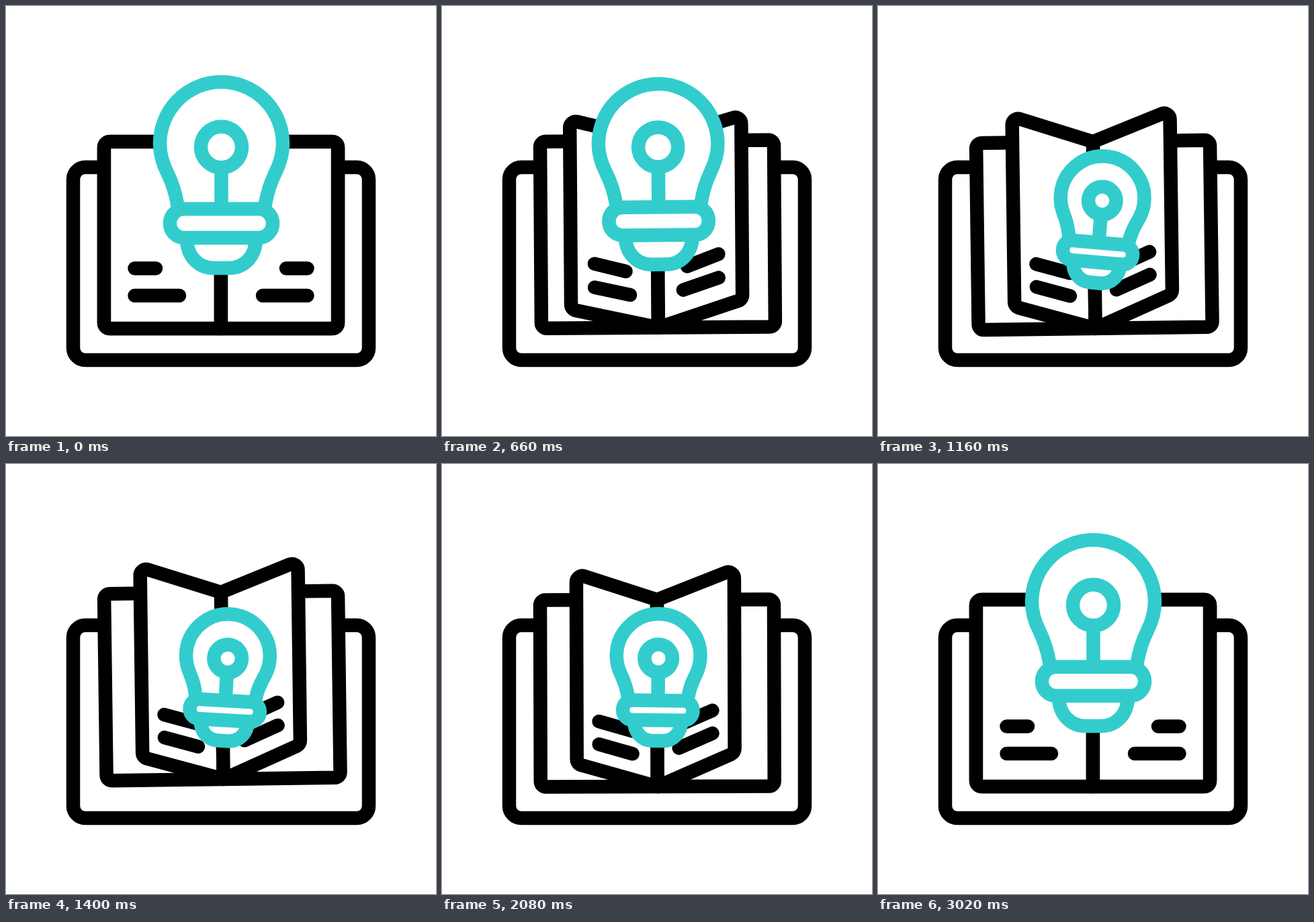
Animation of 640x640 px, one loop 3.22 s. Source, as an HTML page with a canvas:

```html
<!DOCTYPE html>
<html lang="en">
<head>
<meta charset="utf-8">
<title>Book and bulb</title>
<style>
  html, body { margin: 0; width: 100%; height: 100%; overflow: hidden; background: #fff; }
  canvas { display: block; width: 640px; height: 640px; }
</style>
</head>
<body>
<canvas id="stage" width="640" height="640"></canvas>
<script>
const LOOP = 3220, INK = '#000', TEAL = '#33cccc';
const MID = 320, TOP = 202, BOTTOM = 480, HALF = 174;
const ctx = document.getElementById('stage').getContext('2d');

const rad = deg => deg * Math.PI / 180;
const mix = (a, b, u) => a + (b - a) * u;

// 0 before a, 1 after b, cosine ease between
function ease(t, a, b) {
  const u = Math.min(1, Math.max(0, (t - a) / (b - a)));
  return (1 - Math.cos(Math.PI * u)) / 2;
}

function pose(t) {
  const rise = ease(t, 220, 400);
  const drop = ease(t, 400, 1150);
  const swing = ease(t, 400, 900);
  const settle = ease(t, 1800, 2160);
  const close = ease(t, 300, 800);
  const open = ease(t, 2440, 2700);
  const wave = Math.cos(2 * Math.PI * (t - 920) / 960);
  return {
    fold: close - open,
    textFold: close - ease(t, 2440, 2760),
    bookY: 11 * wave * (ease(t, 220, 700) - ease(t, 1420, 1760)),
    bookTilt: -(0.75 * swing + 0.65 * ease(t, 1400, 1740)) * (1 - settle),
    scale: 1 + 0.077 * rise - 0.395 * drop + 0.318 * open,
    bulbX: MID + 2.6 * (rise - settle),
    bulbY: 390 - 15.5 * rise + 37.5 * drop - 22 * ease(t, 2510, 2700),
    bulbTilt: ((11.5 + 1.7 * wave) * swing - 6.5 * rise) * (1 - settle),
    rayHead: ease(t, 2720, 2880),
    rayTail: ease(t, 2820, 3020)
  };
}

// Page sizes when folded; side is -1 for left, 1 for right
const pages = [
  { side: -1, width: 120, top: 163, bottom: 446 },
  { side: 1, width: 115, top: 157, bottom: 430 }
];
const textRows = [
  { y: 390.5, near: 97, lift: 63 },
  { y: 431, near: 62, lift: 29 }
];

function paint(path, color) {
  ctx.fillStyle = '#fff';
  ctx.fill(path);
  ctx.strokeStyle = color;
  ctx.stroke(path);
}

function box(x, y, w, h, r) {
  const p = new Path2D();
  p.roundRect(x, y, w, h, r);
  return p;
}

function line(x0, y0, x1, y1) {
  ctx.beginPath();
  ctx.moveTo(x0, y0);
  ctx.lineTo(x1, y1);
  ctx.stroke();
}

function drawPage({ side, width, top, bottom }, fold) {
  const x = MID + side * mix(HALF, width, fold);
  const y0 = mix(TOP, top, fold), y1 = mix(BOTTOM, bottom, fold);
  const p = new Path2D();
  p.moveTo(MID, TOP);
  p.arcTo(x, y0, x, y1, 9);
  p.arcTo(x, y1, MID, BOTTOM, 9);
  p.lineTo(MID, BOTTOM);
  p.closePath();
  paint(p, INK);
}

// Folded text runs parallel to the bottom edge of its page
function drawText({ side, width, bottom }, fold) {
  const far = width - 33, run = 50;
  const sink = run * (BOTTOM - bottom) / width;
  for (const { y, near, lift } of textRows) {
    const y0 = bottom - lift;
    line(MID + side * mix(128.5, far, fold), mix(y, y0, fold),
      MID + side * mix(near, far - run, fold), mix(y, y0 + sink, fold));
  }
}

function drawBook(p) {
  ctx.save();
  ctx.translate(MID, TOP + p.bookY);
  ctx.rotate(rad(p.bookTilt));
  ctx.translate(-MID, -TOP);
  paint(box(MID - HALF, TOP, 2 * HALF, BOTTOM - TOP, 8), INK);
  pages.forEach(page => drawPage(page, p.fold));
  ctx.lineCap = 'round';
  pages.forEach(page => drawText(page, p.textFold));
  ctx.restore();
}

// Bulb outlines around the foot of the bulb
const ring = new Path2D();
ring.arc(0, -180, 30.5, 0, 2 * Math.PI);
const bulbParts = [
  new Path2D('M-65 -93C-68.5 -114 -74.5 -130 -80.5 -142C-88.5 -158 -91.5 -171 -91.5 -185A91.5 92 0 0 1 91.5 -185C91.5 -171 88.5 -158 80.5 -142C74.5 -130 68.5 -114 65 -93'),
  new Path2D('M0 -149V-90'),
  ring,
  new Path2D('M-51.5 -44C-51.5 -18 -34.5 0 -11.5 0H11.5C34.5 0 51.5 -18 51.5 -44'),
  box(-76.5, -88, 153, 43, 21)
];

// Outlines scale, line weight stays
function drawBulb(p) {
  const m = new DOMMatrix().translate(p.bulbX + 0.5, p.bulbY)
    .rotate(p.bulbTilt).scale(p.scale);
  ctx.lineCap = 'butt';
  for (const part of bulbParts) {
    const path = new Path2D();
    path.addPath(part, m);
    paint(path, TEAL);
  }
}

function drawRays({ rayHead, rayTail }) {
  if (rayHead <= 0 || rayTail >= 1) return;
  ctx.strokeStyle = TEAL;
  ctx.lineCap = 'round';
  const r0 = mix(124, 153, rayTail), r1 = mix(124, 153, rayHead);
  for (let i = -2; i <= 2; i++) {
    const s = Math.sin(rad(i * 43)), c = Math.cos(rad(i * 43));
    line(318.5 + r0 * s, 201 - r0 * c, 318.5 + r1 * s, 201 - r1 * c);
  }
}

function draw(t) {
  const p = pose(t);
  ctx.fillStyle = '#fff';
  ctx.fillRect(0, 0, 640, 640);
  ctx.lineWidth = 20.5;
  ctx.lineJoin = 'round';
  paint(box(100, 240, 440, 287, 18), INK);
  drawBook(p);
  drawBulb(p);
  drawRays(p);
}

const start = performance.now();
function tick() {
  draw((performance.now() - start) % LOOP);
  requestAnimationFrame(tick);
}
tick();
</script>
</body>
</html>
```
